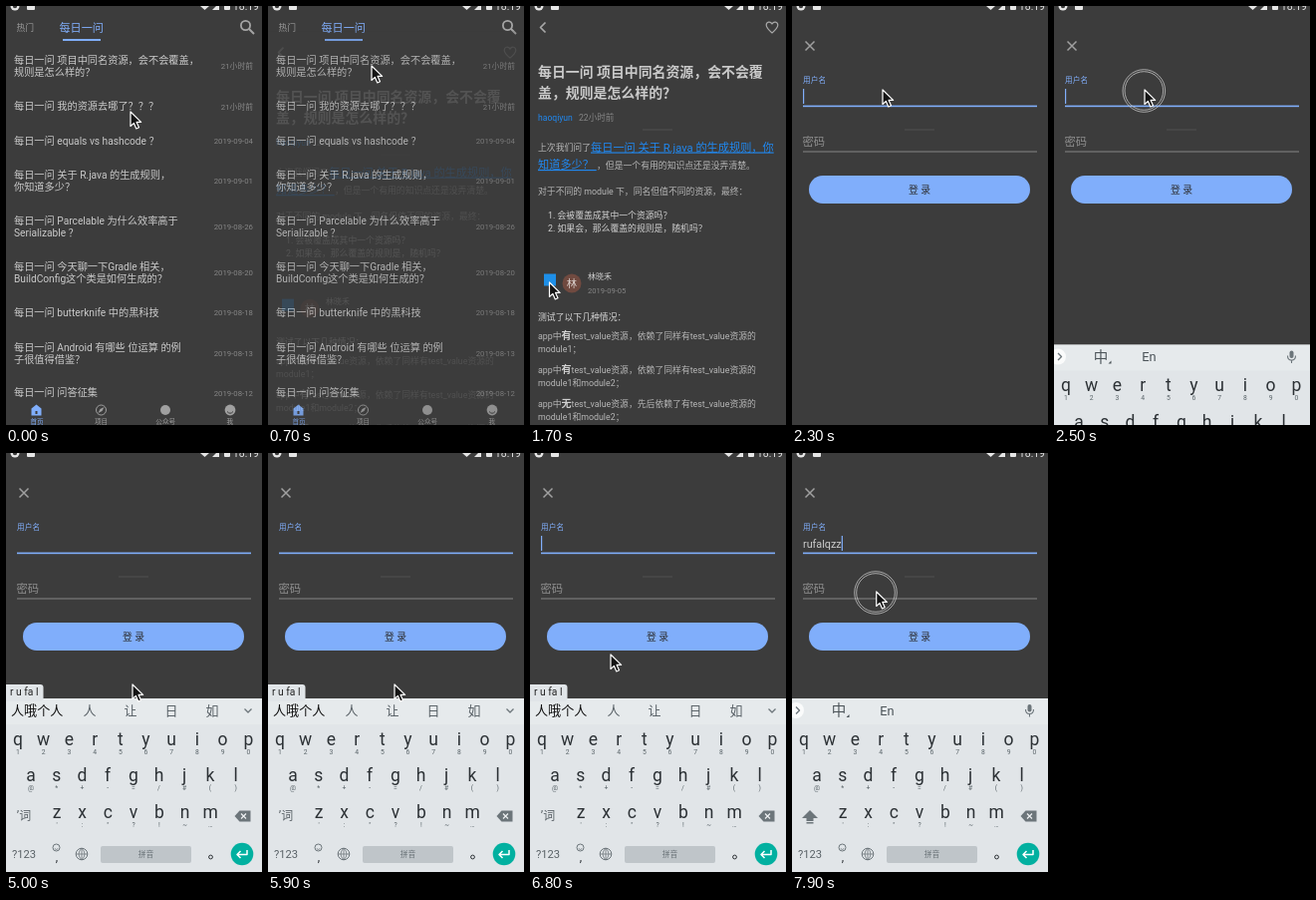
Recreate the animation shown at these times as an HTML page. Size 257 px wide and 420 px high, loop 8 s.

```html
<!DOCTYPE html>
<html lang="zh-CN">
<head>
<meta charset="utf-8">
<style>
  html, body { margin: 0; height: 100%; overflow: hidden; background: #3c3c3c; }
  svg { display: block; width: 100%; height: 100%; }
  text { font-family: Roboto, "Noto Sans CJK SC", "Noto Sans CJK", sans-serif; white-space: pre; }
</style>
</head>
<body>
<svg id="stage" viewBox="0 0 257 420"></svg>
<script>
const LOOP = 8000;
const BG = '#3c3c3c', BLUE = '#80aefb', LINK = '#2088f0', LIGHT = '#cacaca', DIM = '#868686';
const stage = document.getElementById('stage');

function add(parent, tag, attrs, content) {
  const el = document.createElementNS('http://www.w3.org/2000/svg', tag);
  for (const key in attrs) el.setAttribute(key, attrs[key]);
  if (content !== undefined) el.textContent = content;
  parent.appendChild(el);
  return el;
}
const group = (parent = stage) => add(parent, 'g', {});
const rect = (g, x, y, width, height, fill, rx = 0) => add(g, 'rect', { x, y, width, height, fill, rx });
const circle = (g, cx, cy, r, fill, stroke = 'none', width = 1) =>
  add(g, 'circle', { cx, cy, r, fill, stroke, 'stroke-width': width });
const line = (g, d, stroke, width = 1.5) =>
  add(g, 'path', { d, stroke, fill: 'none', 'stroke-width': width, 'stroke-linejoin': 'round' });
const shape = (g, d, fill) => add(g, 'path', { d, fill });
const text = (g, x, y, size, fill, content, extra = {}) =>
  add(g, 'text', { x, y, fill, 'font-size': size, ...extra }, content);
const MID = { 'text-anchor': 'middle' }, END = { 'text-anchor': 'end' };

function page() {
  const g = group();
  rect(g, 0, 0, 257, 420, BG);
  return g;
}
const handle = g => line(g, 'M113 124H143', '#4e4e4e', 1.2);

// Question list
const list = page();
text(list, 10.5, 25, 8.8, '#9a9a9a', '热门');
text(list, 53.5, 25.5, 11.1, BLUE, '每日一问');
rect(list, 57, 33, 38, 2, BLUE);
circle(list, 240.5, 19.5, 4.6, 'none', '#a5a5a5', 1.8);
line(list, 'M244 23L249 28', '#a5a5a5', 2);
[
  [57.5, '21小时前', '项目中同名资源，会不会覆盖，', '规则是怎么样的？'],
  [104, '21小时前', '我的资源去哪了？？？'],
  [138.5, '2019-09-04', 'equals vs hashcode ？'],
  [172.5, '2019-09-01', '关于 R.java 的生成规则，', '你知道多少？'],
  [218.5, '2019-08-26', 'Parcelable 为什么效率高于', 'Serializable ？'],
  [264.5, '2019-08-20', '今天聊一下Gradle 相关，', 'BuildConfig这个类是如何生成的？'],
  [310.5, '2019-08-18', 'butterknife 中的黑科技'],
  [345.5, '2019-08-13', 'Android 有哪些 位运算 的例', '子很值得借鉴？'],
  [391, '2019-08-12', '问答征集']
].forEach(([y, date, first, second]) => {
  text(list, 8, y, 10.2, LIGHT, '每日一问 ' + first);
  if (second) text(list, 8, y + 12, 10.2, LIGHT, second);
  text(list, 248, y + (second ? 5 : -.5), 7.8, DIM, date, END);
});
rect(list, 0, 396, 257, 24, BG);
['首页', '项目', '公众号', '我'].forEach((label, i) =>
  text(list, 31 + i * 64.6, 418.5, 6.6, i ? '#a0a0a0' : BLUE, label, MID));
shape(list, 'M30.5 399.5L35.5 403.5V410.5H25.5V403.5Z', BLUE);
rect(list, 29.5, 406, 2, 3, BG);
circle(list, 95.5, 405, 5, 'none', '#a0a0a0');
shape(list, 'M98.5 402L96.5 406L92.5 408L94.5 404Z', '#a0a0a0');
circle(list, 160, 405, 5, '#a0a0a0');
circle(list, 225, 405, 5.4, '#a0a0a0');
line(list, 'M222 406.5Q225 410 228 406.5', BG, 1);

// Article
const article = page();
line(article, 'M15.5 16.5L10.5 21.5L15.5 26.5', '#a8a8a8', 1.7);
line(article, 'M243 27C239 23.5 237.2 21.5 237.2 19.3C237.2 15.5 241.5 15 243 18C244.5 15 248.8 15.5 248.8 19.3C248.8 21.5 247 23.5 243 27Z', '#a8a8a8', 1.2);
const bold = { 'font-weight': 700 };
text(article, 8, 71, 13.9, LIGHT, '每日一问 项目中同名资源，会不会覆', bold);
text(article, 8, 92, 13.9, LIGHT, '盖，规则是怎么样的？', bold);
text(article, 8, 115, 8.6, LINK, 'haoqiyun');
text(article, 49, 115, 8.6, DIM, '22小时前');
handle(article);
const BODY = 8.83, BODY_FILL = '#b6b6b6';
const underline = { 'text-decoration': 'underline' };
const body = (x, y, content) => text(article, x, y, BODY, BODY_FILL, content);
body(8, 145, '上次我们问了');
text(article, 61, 145.5, 11.2, LINK, '每日一问 关于 R.java 的生成规则，你', underline);
text(article, 8, 163, 11.2, LINK, '知道多少？ ', underline);
body(67, 162.5, '，但是一个有用的知识点还是没弄清楚。');
body(8, 188.5, '对于不同的 module 下，同名但值不同的资源，最终：');
text(article, 18, 212.5, BODY, '#d0d0d0', '1. 会被覆盖成其中一个资源吗？');
text(article, 18, 225.5, BODY, '#d0d0d0', '2. 如果会，那么覆盖的规则是，随机吗？');
rect(article, 14, 268.5, 12, 12, '#1e8fe8');
circle(article, 42, 278, 9.5, '#704a40');
text(article, 42, 281.8, 10.3, '#e0d8d4', '林', MID);
text(article, 58, 274, 8, '#d0d0d0', '林晓禾');
text(article, 58, 287.5, 7.6, DIM, '2019-09-05');
text(article, 8, 314.5, BODY, '#d8d8d8', '测试了以下几种情况：', { 'font-weight': 500 });
[
  [333.5, '有', '依赖了同样有', 'module1；'],
  [367.5, '有', '依赖了同样有', 'module1和module2；'],
  [401.5, '无', '先后依赖了有', 'module1和module2；']
].forEach(([y, word, relation, modules]) => {
  const row = body(8, y, 'app中');
  add(row, 'tspan', { 'font-weight': 700, 'font-size': 10, fill: '#d0d0d0' }, word);
  add(row, 'tspan', {}, `test_value资源，${relation}test_value资源的`);
  body(8, y + 13.5, modules);
});

// Login form
const login = page();
line(login, 'M13.5 35.5L22.5 44.5M22.5 35.5L13.5 44.5', '#a0a0a0', 1.5);
text(login, 11, 77, 7.7, BLUE, '用户名');
const userName = text(login, 11, 95, 10.8, LIGHT, '');
const caret = rect(login, 11, 83, 1.2, 15, BLUE);
rect(login, 11, 99.6, 235, 1.6, BLUE);
handle(login);
text(login, 10.5, 140, 11.3, '#8e8e8e', '密码');
rect(login, 11, 145.5, 235, 1, '#868686');
rect(login, 17, 170, 222, 28, BLUE, 14);
text(login, 128, 187.5, 9.8, '#2c2c2c', '登 录', MID);

// Keyboard
const keyboard = group();
const KEY = '#2c3135', HINT = '#5c666b', ICON = '#6c757a', KEY_BG = '#e1e5e8';
rect(keyboard, 0, 246, 257, 174, KEY_BG);
rect(keyboard, 0, 246, 257, 26, '#e6eaec');
[
  ['qwertyuiop', '1234567890', 12, 292.5],
  ['asdfghjkl', '@*+-=/#()', 25, 329],
  ['zxcvbnm', '\':"?!~…', 51, 366.3]
].forEach(([letters, hints, x0, y]) => [...letters].forEach((letter, i) => {
  const x = x0 + i * 25.7;
  text(keyboard, x, y, 17.5, KEY, letter, MID);
  text(keyboard, x, y + 9, 6.8, HINT, hints[i], MID);
}));
shape(keyboard, 'M229.5 364L234.5 358.5H245.5V369.5H234.5Z', ICON);
line(keyboard, 'M236 361.5L241 366.5M241 361.5L236 366.5', '#eef0f2', 1.2);
text(keyboard, 18, 406, 11.2, '#596166', '?123', MID);
circle(keyboard, 50.5, 395.5, 3.5, 'none', ICON);
line(keyboard, 'M48.8 396.5Q50.5 398.5 52.2 396.5', ICON, .8);
text(keyboard, 51, 409, 12, KEY, ',', MID);
circle(keyboard, 76, 402, 5.8, 'none', ICON);
line(keyboard, 'M70 402H82M76 396V408M76 396Q70 402 76 408Q82 402 76 396', ICON, .8);
rect(keyboard, 95, 394, 91, 17, '#bfc5c9', 2);
text(keyboard, 140.5, 405, 7.8, '#697277', '拼音', MID);
circle(keyboard, 205.5, 405, 1.9, 'none', KEY);
circle(keyboard, 237, 402, 11.3, '#02b0a0');
line(keyboard, 'M242 398V402.5H232M235.5 399L232 402.5L235.5 406', '#fff', 1.5);

const candidates = group(keyboard);
const bubble = rect(candidates, -3, 232, 44, 17, KEY_BG, 3);
const pinyin = text(candidates, 4, 243, 10.3, '#222', '');
text(candidates, 5, 263, 13.1, '#111', '人哦个人');
[...'人让日如'].forEach((word, i) => text(candidates, 84 + i * 41, 263, 13, '#586066', word, MID));
line(candidates, 'M239.5 256.5L243 260L246.5 256.5', ICON, 1.3);
text(candidates, 18, 368, 12, '#596166', '’词', MID);

const toolbar = group(keyboard);
circle(toolbar, 4, 258, 8, '#fafbfb');
line(toolbar, 'M4 254.5L7.5 258L4 261.5', ICON, 1.4);
text(toolbar, 47, 263.3, 14.5, '#4c5459', '中', MID);
shape(toolbar, 'M57.5 262V265H54.5Z', '#4c5459');
text(toolbar, 95.5, 262.5, 12.8, '#4c5459', 'En', MID);
rect(toolbar, 236.5, 252, 4, 7.5, ICON, 2);
line(toolbar, 'M234.5 257Q234.5 261.5 238.5 261.5Q242.5 261.5 242.5 257M238.5 261.5V264.5', ICON, 1.1);
shape(toolbar, 'M18 358L26 366H21.5V369H14.5V366H10Z', ICON);
rect(toolbar, 14.5, 370, 7, 1.5, ICON);

// Status bar, cut by the top edge
const status = group();
circle(status, 9, 0, 4.5, '#e6e6e6');
circle(status, 9, 0, 2.2, BG);
rect(status, 21, -4, 8, 8, '#e6e6e6', 1);
shape(status, 'M195 0H204L199.5 4Z', '#e6e6e6');
shape(status, 'M207 4L214 -3V4Z', '#e6e6e6');
rect(status, 219, -5, 6, 9, '#e6e6e6', 1);
text(status, 254, 4, 10.5, '#e6e6e6', '18:19', END);

// Pointer
const ring = group();
circle(ring, 0, 0, 21.3, 'none', '#c4c4c4', .8);
circle(ring, 0, 0, 19.3, 'none', '#c4c4c4', .8);
const pointer = add(stage, 'path', {
  d: 'M0 0V14.5L3.4 11.4L5.8 17L8.5 15.8L6.1 10.4H10.6Z',
  fill: '#141414', stroke: '#fff', 'stroke-width': 1.2, 'stroke-linejoin': 'round'
});

// Timeline
const POINTER_PATH = [
  [0, 125, 106], [100, 125, 106], [450, 104, 60], [950, 104, 60], [1600, 19.5, 277], [1850, 19.5, 277],
  [2250, 91, 84], [4250, 91, 84], [4950, 127, 232], [6250, 127, 232], [6750, 81, 202],
  [7250, 81, 202], [7750, 84.7, 139], [8000, 84.7, 139]
];
const CLICKS = [500, 1760, 2400, 7850];
const SYLLABLES = ['r', 'r u', 'r u f', 'r u fa', 'r u fa l', 'r u fa l q', 'r u fa l q z', 'r u fa l q z z'];
const KEY_TIMES = [2650, 2750, 2850, 2950, 3050, 6900, 7000, 7100];
const COMMIT = 7200;

const progress = (t, start, length) => Math.min(1, Math.max(0, (t - start) / length));
const ease = p => p * p * (3 - 2 * p);
const show = (el, on) => el.setAttribute('visibility', on ? 'inherit' : 'hidden');
const move = (el, x, y) => el.setAttribute('transform', `translate(${x} ${y})`);

function pointerAt(t) {
  const i = POINTER_PATH.findIndex(stop => stop[0] > t);
  const [t0, x0, y0] = POINTER_PATH[i - 1], [t1, x1, y1] = POINTER_PATH[i];
  const p = ease(progress(t, t0, t1 - t0));
  return [x0 + (x1 - x0) * p, y0 + (y1 - y0) * p];
}

function openPage(el, t, start) {
  const p = ease(progress(t, start, 200));
  el.setAttribute('opacity', p);
  move(el, 0, 30 * (1 - p));
}

function render(t) {
  openPage(article, t, 650);
  openPage(login, t, 1900);

  move(keyboard, 0, 190 * (1 - ease(progress(t, 2400, 200))));
  const keys = KEY_TIMES.filter(time => time <= t).length;
  const committed = t >= COMMIT, composing = keys > 0 && !committed;
  show(candidates, composing);
  show(toolbar, !composing);
  if (composing) {
    pinyin.textContent = SYLLABLES[keys - 1];
    bubble.setAttribute('width', pinyin.getComputedTextLength() + 12);
  }

  userName.textContent = committed ? 'rufalqzz' : '';
  caret.setAttribute('x', 11 + (committed ? userName.getComputedTextLength() : 0));
  // The caret holds while typing, then blinks once a second.
  show(caret, t < 3350 || committed || (t - 3350) % 1000 < 500);

  const [x, y] = pointerAt(t);
  move(pointer, x, y);
  move(ring, x - .7, y + 1);
  show(ring, CLICKS.some(click => t >= click && t < click + 150));
}

function tick() {
  render(performance.now() % LOOP);
  requestAnimationFrame(tick);
}
tick();
</script>
</body>
</html>
```
